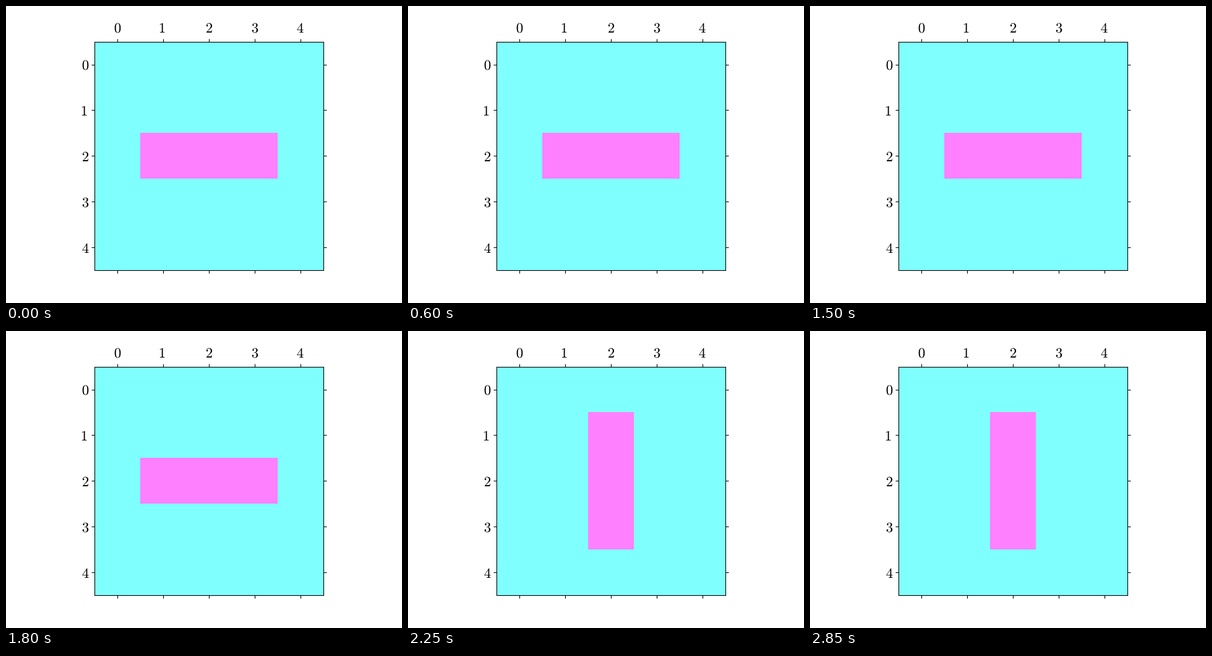
These frames come from a looping animation (640x480 px, 3000 ms). A matplotlib script:

```python
import numpy as np
import matplotlib.pyplot as plt
from matplotlib.animation import FuncAnimation
from matplotlib.patches import PathPatch
from matplotlib.textpath import TextPath
from matplotlib.transforms import Affine2D

WIDTH, HEIGHT, DPI = 640, 480, 100
FRAMES, INTERVAL = 20, 150
CELLS = 5
DIGIT_SIZE = 23

plt.rcParams["mathtext.fontset"] = "cm"

fig = plt.figure(figsize=(WIDTH / DPI, HEIGHT / DPI), dpi=DPI)
ax = fig.add_subplot()
pixels = Affine2D().scale(1 / WIDTH, 1 / HEIGHT) + fig.transFigure


def draw_digit(n, x, baseline):
    """Draw a digit centred on x; the baseline is measured from the top."""
    path = TextPath((x - DIGIT_SIZE / 4, HEIGHT - baseline), f"${n}$",
                    size=DIGIT_SIZE)
    fig.add_artist(PathPatch(path, facecolor="black", linewidth=0,
                             transform=pixels))


def next_generation(grid):
    """Apply one step of Conway's Game of Life on a wrapped grid."""
    around = sum(np.roll(grid, (dy, dx), (0, 1))
                 for dy in (-1, 0, 1) for dx in (-1, 0, 1) if dy or dx)
    return ((around == 3) | ((grid == 1) & (around == 2))).astype(int)


start = np.zeros((CELLS, CELLS), dtype=int)
start[2, 1:4] = 1
generations = [start]
for _ in range(FRAMES - 1):
    generations.append(next_generation(generations[-1]))

image = ax.imshow(start, cmap="cool", vmin=0, vmax=1, alpha=0.5,
                  interpolation="nearest")
ax.set_xticks(range(CELLS))
ax.set_yticks(range(CELLS))
ax.tick_params(top=True, bottom=True, left=True, right=True,
               labelbottom=False, labelleft=False)

for n, x in enumerate((180.5, 252.5, 328.5, 402.5, 475.5)):
    draw_digit(n, x, 43)
    draw_digit(n, 126.5 if n == 1 else 128.5, round(102.9 + 73.92 * n))


def update(frame):
    image.set_data(generations[frame])
    return (image,)


anim = FuncAnimation(fig, update, frames=FRAMES, interval=INTERVAL,
                     repeat=True, repeat_delay=0, blit=False)
plt.show()
```
